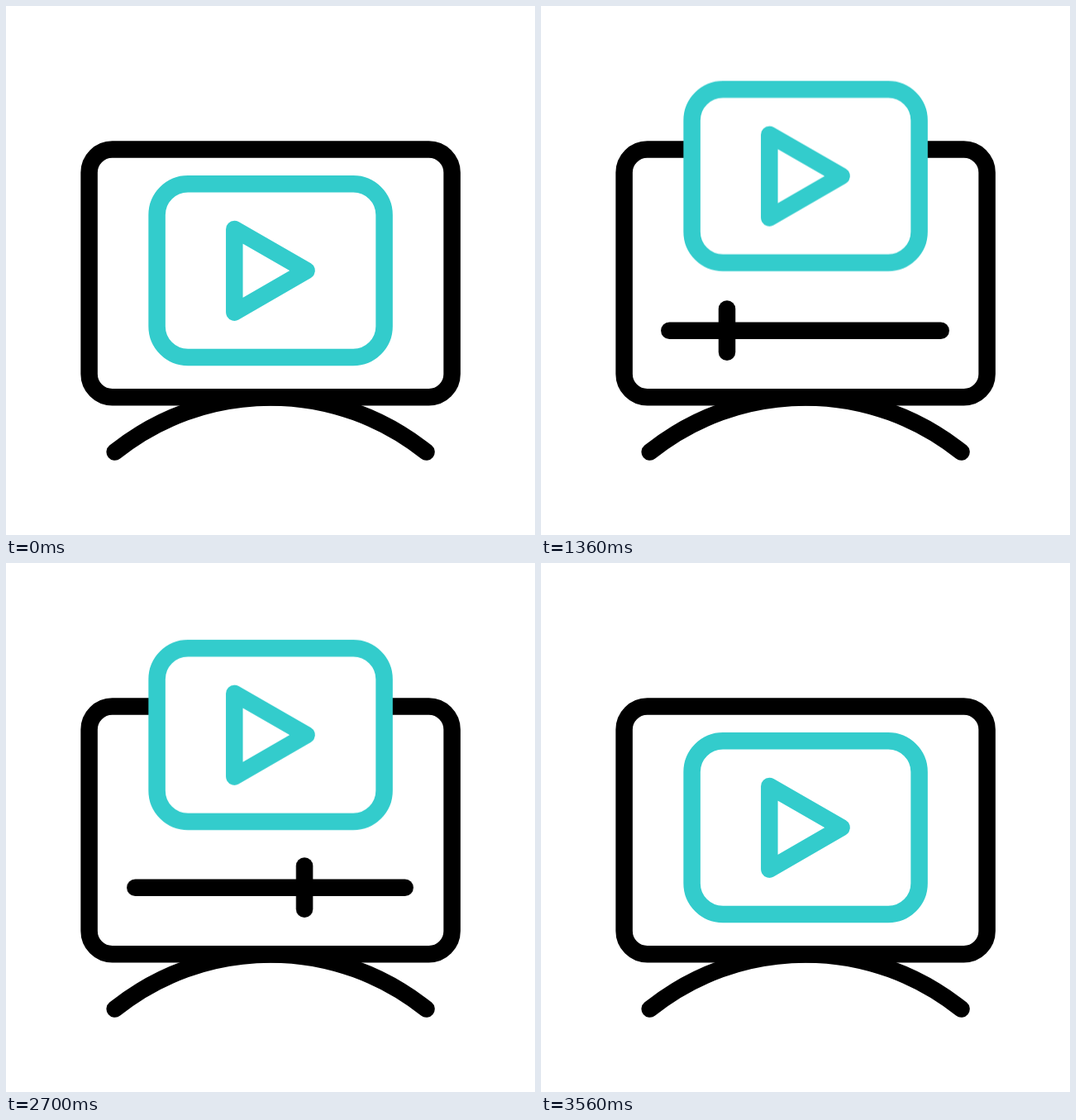
Write an HTML page that moves like this. It is 640 px wide and 640 px high and loops after 3600 ms.

```html
<!DOCTYPE html>
<html lang="en">
<head>
<meta charset="utf-8">
<title>Video player</title>
<style>
  html, body {
    margin: 0;
    width: 100%;
    height: 100%;
    overflow: hidden;
    background: #fff;
  }
  svg {
    display: block;
    width: 100vw;
    height: 100vh;
    fill: none;
    stroke: #000;
    stroke-width: 20.5;
    stroke-linecap: round;
    stroke-linejoin: round;
  }
  svg * { vector-effect: non-scaling-stroke; }

  .panel, .frame, .play, .track, .knob {
    transform-origin: 320px 320px;
    animation: 3.6s linear infinite;
  }
  .panel { stroke: #3cc; animation-name: lift; }
  .frame { fill: #fff; --min: .958; animation-name: pulse; }
  .play { --min: .938; animation-name: pulse; }
  .track { transform-origin: 319.5px 392.7px; animation-name: grow; }
  .knob { animation-name: slide; }

  @keyframes lift {
    0%, 5% { transform: translateY(0); animation-timing-function: cubic-bezier(.667, 0, .05, 1); }
    36.11% { transform: translateY(-114.4px); }
    68.61% { transform: translateY(-114.4px); animation-timing-function: cubic-bezier(.95, 0, .333, 1); }
    99.72%, 100% { transform: translateY(0); }
  }
  @keyframes grow {
    0%, 5% { transform: scaleX(.683); animation-timing-function: cubic-bezier(.667, 0, .05, 1); }
    36.11% { transform: scaleX(1); }
    68.61% { transform: scaleX(1); animation-timing-function: cubic-bezier(.95, 0, .333, 1); }
    99.72%, 100% { transform: scaleX(.683); }
  }
  @keyframes pulse {
    0%, 39.44% { transform: scale(1); animation-timing-function: cubic-bezier(.333, 0, .667, 1); }
    52.78% { transform: scale(var(--min)); animation-timing-function: cubic-bezier(.333, 0, .667, 1); }
    66.67%, 100% { transform: scale(1); }
  }
  @keyframes slide {
    0%, 43.89% { transform: translateX(0); animation-timing-function: cubic-bezier(.333, 0, .667, 1); }
    91.67%, 100% { transform: translateX(188.9px); }
  }
</style>
</head>
<body>
<svg viewBox="0 0 640 640">
  <rect x="100.6" y="173.5" width="439" height="299.8" rx="28"/>
  <path d="M131.7 539.6A301.2 301.2 0 0 1 508.5 539.6"/>
  <path class="track" d="M155.3 392.7H483.7"/>
  <path class="knob" d="M225 366.5V418.7"/>
  <g class="panel">
    <rect class="frame" x="182.6" y="215.3" width="275" height="209.8" rx="37.5"/>
    <path class="play" d="M276.3 269.9L363.7 320.2L276.3 370.6Z"/>
  </g>
</svg>
</body>
</html>
```
